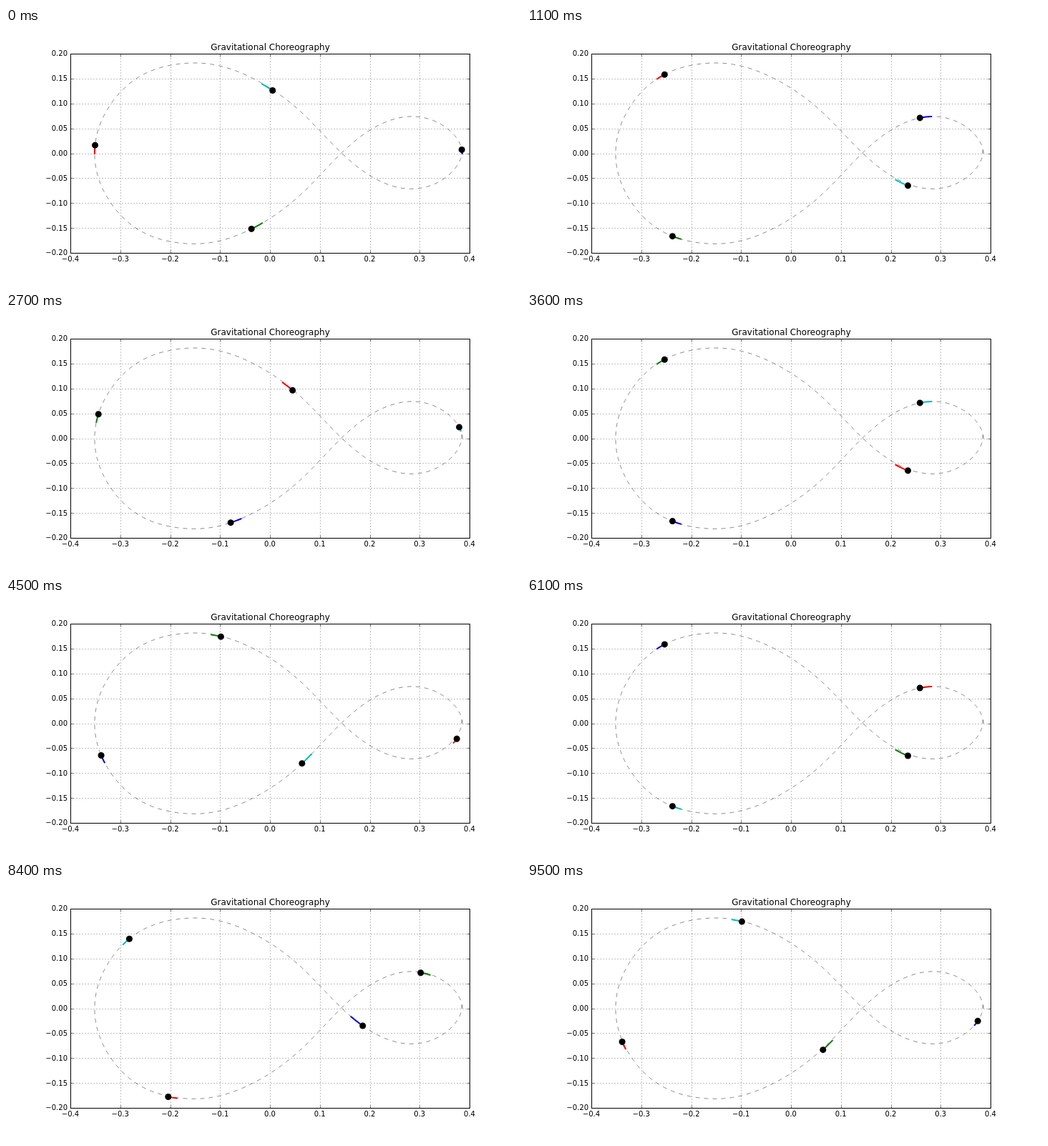
An HTML page for the animation above (9.6 s loop, 720 by 360 pixels).

```html
<!DOCTYPE html>
<html lang="en">
<head>
<meta charset="utf-8">
<title>Gravitational Choreography</title>
<style>
html, body { margin: 0; width: 100%; height: 100%; overflow: hidden; background: #fff; }
svg { display: block; }
text { font: 10px "DejaVu Sans", sans-serif; text-anchor: middle; }
.y { text-anchor: end; }
.title { font-size: 12px; }
.grid { stroke: #000; stroke-width: .5; stroke-dasharray: 1 3; }
.tick { stroke: #000; stroke-width: .5; }
.box { fill: none; stroke: #000; }
.orbit { fill: none; stroke: #000; stroke-opacity: .45; stroke-dasharray: 6 6; }
.trail { fill: none; stroke-width: 2; stroke-linecap: square; }
</style>
</head>
<body>
<svg id="plot" width="720" height="360" viewBox="0 0 720 360"></svg>
<script>
const svg = document.getElementById('plot');
const L = 90, R = 648, T = 36, B = 315;
const STEP = 100, STEPS = 96, PERIOD = 100;

// Harmonics of the shared closed orbit, in pixels about the plot centre
const CX = 369.4, CY = 175.9;
const AX = [0, -250.7, 14.2, -9.3, 0, 2.2, -2.8, 2, 0, -1.1, 0];
const AY = [0, 74.2, 75.7, -19.9, 0, 5.7, -4, 1.8, 0, -.5, .9];

// One body per quarter period; drift is its share of the growing instability
const bodies = [
  { color: '#f00', phase: 0, drift: -.5 },
  { color: '#008000', phase: 75, drift: -.5 },
  { color: '#00f', phase: 50, drift: 1 },
  { color: '#00bfbf', phase: 25, drift: 0 },
];

function add(tag, attrs, text) {
  const el = document.createElementNS('http://www.w3.org/2000/svg', tag);
  for (const k in attrs) el.setAttribute(k, attrs[k]);
  if (text) el.textContent = text;
  return svg.appendChild(el);
}

function position(body, n) {
  const a = 2 * Math.PI * (n + body.phase) / PERIOD;
  let x = CX, y = CY - 5 * body.drift * (n / PERIOD) ** 6;
  for (let k = 1; k < AX.length; k++) {
    x += AX[k] * Math.cos(k * a);
    y -= AY[k] * Math.sin(k * a);
  }
  return [x, y];
}

function curve(body, from, to, pieces) {
  const pts = [];
  for (let i = 0; i <= pieces; i++)
    pts.push(position(body, from + (to - from) * i / pieces).map(v => v.toFixed(2)).join(' '));
  return 'M' + pts.join('L');
}

const snap = v => Math.round(v) + .5;
const label = (v, digits) => v.toFixed(digits).replace('-', '\u2212');
const line = (cls, d) => add('path', { class: cls, d });

for (let i = 0; i <= 8; i++) {
  const px = L + (R - L) * i / 8, py = T + (B - T) * i / 8;
  const x = snap(px), y = snap(py);
  if (i % 8) {
    line('grid', `M${x} ${B + .5}V${T}`);
    line('grid', `M${L + .5} ${y}H${R}`);
  }
  line('tick', `M${x} ${T + .5}v4M${x} ${B + .5}v-4M${L + .5} ${y}h4M${R + .5} ${y}h-4`);
  add('text', { x: px, y: 327 }, label((i - 4) / 10, 1));
  add('text', { x: 86, y: Math.round(py + 3.4), class: 'y' }, label((4 - i) / 20, 2));
}
add('text', { x: 369.5, y: 31, class: 'title' }, 'Gravitational Choreography');

line('orbit', curve(bodies[2], 0, PERIOD, 400));

for (const b of bodies) b.trail = add('path', { class: 'trail', stroke: b.color });
for (const b of bodies) b.dot = add('circle', { r: 4.5 });

add('rect', { class: 'box', x: L + .5, y: T + .5, width: R - L, height: B - T });

function draw(now) {
  const n = Math.floor(now / STEP) % STEPS;
  for (const b of bodies) {
    const [x, y] = position(b, n + 1);
    b.trail.setAttribute('d', curve(b, n, n + 1, 4));
    b.dot.setAttribute('cx', x);
    b.dot.setAttribute('cy', y);
  }
}

let start;
function tick(now) {
  start ??= now;
  draw(now - start);
  requestAnimationFrame(tick);
}
draw(0);
requestAnimationFrame(tick);
</script>
</body>
</html>
```
